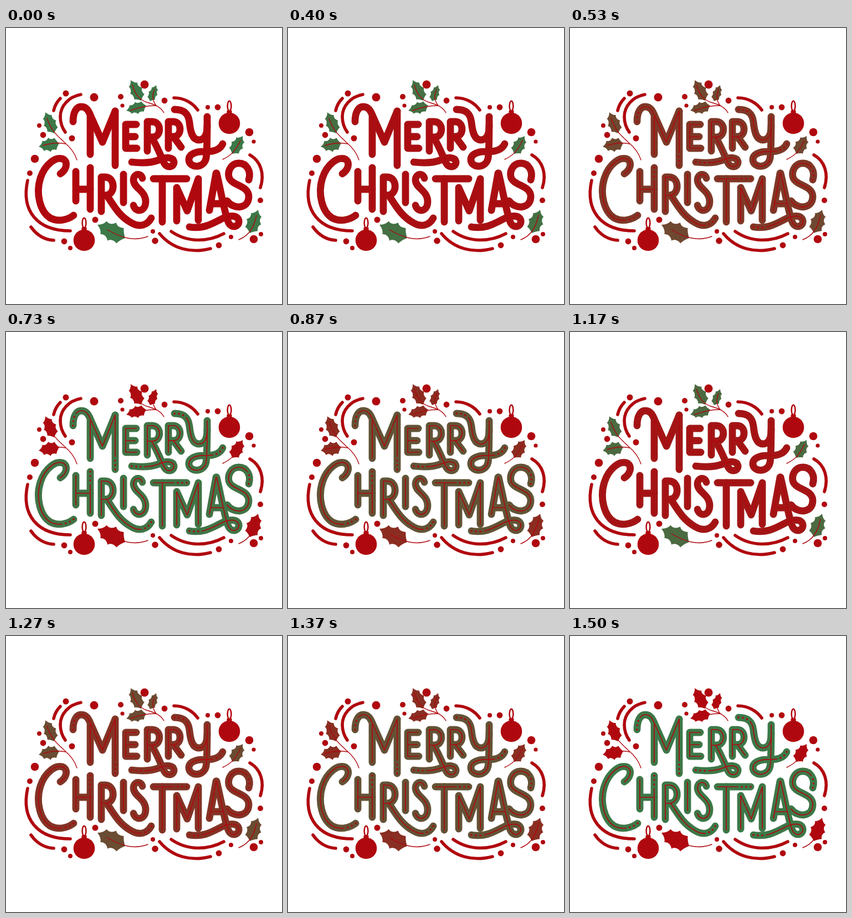
Write an HTML page that moves like this. It is 498x498 px and loops after 1860 ms.

```html
<!DOCTYPE html>
<html lang="en">
<head>
<meta charset="utf-8">
<title>Merry Christmas</title>
<style>
html, body { margin: 0; width: 100%; height: 100%; overflow: hidden; background: #fff; }
svg { display: block; width: 100%; height: 100%; fill: none; stroke-linecap: round; stroke-linejoin: round; }
</style>
</head>
<body>
<svg viewBox="0 0 498 498" role="img" aria-label="Merry Christmas">
  <g id="leaves"></g>
  <g id="stems" stroke="#b0080f" stroke-width="1.4"></g>
  <g id="arcs" stroke="#b0080f" stroke-width="5.6"></g>
  <g id="balls" fill="#b0080f"></g>
  <g id="letters" stroke-width="12.8"></g>
  <g id="lines" stroke="#b0080f" stroke-width="1.7"></g>
  <g id="beads" stroke="#b0080f" stroke-width="3.6"></g>
</svg>
<script>
const RED = [176, 8, 15], GREEN = [60, 120, 72];
const STEP = 100 / 3, LOOP = 1860, PHASE = 56 * STEP / 5;
const get = id => document.getElementById(id);

function add(parent, tag, attrs) {
  const el = document.createElementNS("http://www.w3.org/2000/svg", tag);
  for (const key in attrs) el.setAttribute(key, attrs[key]);
  get(parent).appendChild(el);
}

// Strokes of the lettering; beaded ones begin at their beaded end.
const plain = [
  // MERRY
  "M152 160V228",
  "M235 174H216V217H236M216 196H233",
  "M255 222V169H264C281 169 281 197 264 197H255",
  "M293 217V169H302C318 169 318 196 302 196H293M302 196L316 215",
  // CHRISTMAS
  "M126 259V312M126 291H152",
  "M172 331V269H179C198 269 198 302 179 302H172",
  "M212 264V315",
  "M246 271C243 261 231 262 230 274C230 289 252 293 252 313C252 332 234 334 230 320",
  "M282 272V350",
  "M308 348V288L327 330L347 272V347",
  "M367 329L379 262M371 317H390"
];
const beaded = [
  "M121 169C121 150 128 142 136 142C145 142 149 149 153 159L174 206L197 150",
  "M197 248V150",
  "M227 242C245 244 262 244 276 238C290 232 301 233 303 241C304 250 292 254 286 245C281 236 273 213 263 198",
  "M304 147C322 147 329 155 331 170C333 190 337 202 348 202C359 202 363 191 363 176",
  "M391 209C386 220 375 223 360 223C342 222 329 228 330 239C332 253 357 254 361 235C363 225 363 190 363 160",
  "M122 338C110 347 94 350 80 343C62 332 53 300 62 271C70 246 91 230 104 237C113 243 108 257 98 263",
  "M152 252V327",
  "M262 343C255 356 241 360 227 352C205 340 195 322 182 302",
  "M326 272H266",
  "M331 359C356 363 370 354 386 346C402 337 417 337 420 347C422 359 406 363 401 350C394 332 389 300 380 262",
  "M438 274C443 258 434 244 420 244C406 244 400 258 402 268C405 285 438 283 438 304C438 327 410 328 399 312"
];
for (const d of plain) {
  add("letters", "path", { d });
  add("lines", "path", { d });
}
for (const d of beaded) {
  add("letters", "path", { d });
  add("lines", "path", { d, "stroke-dasharray": "0 23 999", "stroke-dashoffset": -.01 });
  add("beads", "path", { d, "stroke-dasharray": "0 8 0 8 0 999" });
}

// Holly leaf between tip and base, w = half width.
function leaf(x0, y0, x1, y1, w) {
  const dx = x1 - x0, dy = y1 - y0, len = Math.hypot(dx, dy);
  const at = (u, v) => (x0 + dx * u - dy / len * w * v).toFixed(1) + " " +
                       (y0 + dy * u + dx / len * w * v).toFixed(1);
  const side = s => `M${at(0, 0)}Q${at(.19, .3 * s)} ${at(.22, .72 * s)}` +
    `Q${at(.38, .45 * s)} ${at(.52, s)}Q${at(.62, .58 * s)} ${at(.82, .85 * s)}` +
    `Q${at(.86, .45 * s)} ${at(1, 0)}Z`;
  add("leaves", "path", { d: side(1) + side(-1) });
}
leaf(225, 94, 244, 131, 12);
leaf(271, 103, 260, 132, 8.5);
leaf(217, 149, 253, 140, 11);
leaf(71, 152, 87, 190, 12);
leaf(59, 214, 96, 208, 13);
leaf(427, 195, 408, 227, 12);
leaf(165, 355, 215, 379, 18);
leaf(455, 328, 440, 370, 14);

[
  "M228 103C234 122 242 130 254 134C268 138 279 142 285 153",
  "M268 111C263 122 264 131 271 140",
  "M225 149C240 143 255 140 271 140",
  "M74 163C83 188 93 194 105 206C117 216 124 225 128 238",
  "M67 212C83 207 95 206 107 209",
  "M423 203C414 222 405 231 391 237",
  "M183 364C207 378 230 386 256 376",
  "M452 338C447 361 438 375 420 382"
].forEach(d => add("stems", "path", { d }));

[
  "M86 149Q89 136 98 127",
  "M135 120C113 124 98 141 98 160C98 172 102 181 107 188",
  "M303 126C320 126 336 134 346 148",
  "M440 229C460 240 467 264 459 288",
  "M39 275C27 330 56 366 116 366",
  "M45 359C55 373 69 382 86 383",
  "M298 367C328 388 365 386 393 371",
  "M277 371C300 399 335 407 369 398"
].forEach(d => add("arcs", "path", { d }));

const dots = [
  [108, 118, 5.5], [159, 125, 7.5], [250, 102, 7.5], [207, 124, 5], [210, 140, 3.6],
  [286, 131, 5.4], [364, 143, 4], [382, 143, 5.4], [439, 188, 7.3], [447, 205, 3.6],
  [60, 176, 4], [67, 193, 5.4], [119, 199, 5.5], [52, 236, 7.3], [43, 262, 5],
  [459, 311, 5], [161, 346, 5.5], [105, 385, 5.4], [116, 397, 4], [265, 367, 4],
  [269, 384, 5.8], [384, 392, 5.4], [406, 377, 4], [447, 381, 7.3], [460, 372, 4]
];
for (const [cx, cy, r] of dots) add("balls", "circle", { cx, cy, r });

function bauble(cx, cy, r) {
  add("balls", "circle", { cx, cy, r });
  add("balls", "rect", { x: cx - 4.5, y: cy - r - 4, width: 9, height: 8 });
  add("balls", "ellipse", { cx, cy: cy - r - 12, rx: 3.4, ry: 9, fill: "none", stroke: "#b0080f", "stroke-width": 2.5 });
}
bauble(403, 172, 19.3);
bauble(141, 383, 19.3);

// Five equal phases at 30 steps a second: rest, fade in, out, in, rest.
function share(t) {
  const time = Math.floor((t + 3.5) / STEP) * STEP;
  const x = Math.min(3, Math.max(0, time / PHASE - 1));
  return 1 - Math.abs(x % 2 - 1);
}
const mix = (a, b, p) => `rgb(${a.map((v, i) => Math.round(v + (b[i] - v) * p))})`;

function draw(t) {
  const p = share(t % LOOP);
  get("letters").setAttribute("stroke", mix(RED, GREEN, p));
  get("leaves").setAttribute("fill", mix(GREEN, RED, p));
}

let start = null;
function tick(now) {
  if (start === null) start = now;
  draw(Math.max(0, now - start));
  requestAnimationFrame(tick);
}
draw(0);
requestAnimationFrame(tick);
</script>
</body>
</html>
```
